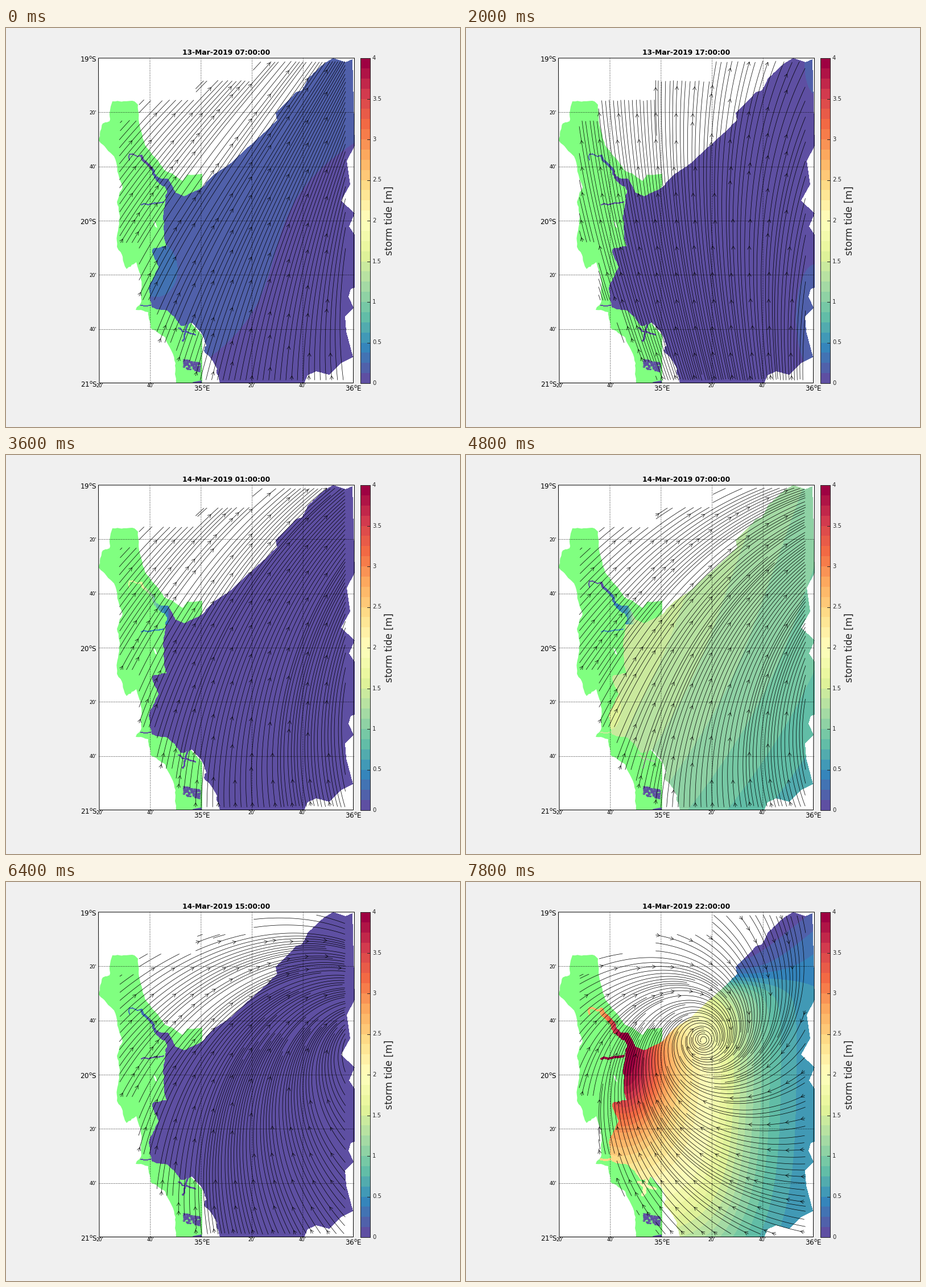
Animation, 798 px wide and 702 px high, one loop 8000 ms. Source, as a matplotlib script:

```python
import math
import random

import matplotlib.pyplot as plt
import numpy as np
from matplotlib.animation import FuncAnimation
from matplotlib.collections import LineCollection
from matplotlib.patches import Polygon, Rectangle
from matplotlib.path import Path

W, H, DPI = 798, 702, 100
HOURS, STEP_MS = 40, 200
PX = 72 / DPI
INK = "#262626"
BANDS = plt.get_cmap("Spectral_r")(np.linspace(0, 1, 32))

fig = plt.figure(figsize=(W / DPI, H / DPI), dpi=DPI, facecolor="#f0f0f0")
ax = fig.add_axes([0, 0, 1, 1])
ax.axis("off")


# ---- coastlines: a few key points, roughened --------------------------
def rough(points, amount, seed=1, depth=3):
    """Midpoint displacement along an open line."""
    rng = random.Random(seed)
    for _ in range(depth):
        out = [points[0]]
        for (xa, ya), (xb, yb) in zip(points, points[1:]):
            if math.hypot(xb - xa, yb - ya) > 6:
                out.append(((xa + xb) / 2 + rng.uniform(-amount, amount),
                            (ya + yb) / 2 + rng.uniform(-amount, amount)))
            out.append((xb, yb))
        points, amount = out, amount * 0.7
    return points


land_east = rough([
    (187, 129), (222, 128), (232, 135), (235, 172), (244, 205), (259, 225),
    (278, 250), (310, 269), (318, 258), (345, 256)], 1.5)
land_inner = [(345, 277), (292, 400), (290, 480), (345, 541), (345, 625)]
land_west = rough([
    (299, 625), (298, 590), (280, 545), (254, 528), (250, 500), (228, 496),
    (238, 480), (237, 436), (229, 412), (212, 424), (195, 385), (199, 345),
    (195, 306), (205, 280), (190, 226), (163, 198), (170, 168), (182, 164),
    (184, 138)], 2)
sea_east = [
    (575, 53), (597, 60), (609, 55), (613, 207), (599, 234), (605, 275),
    (589, 304), (613, 326), (603, 349), (613, 364), (613, 457), (606, 459),
    (602, 473), (611, 492), (596, 507), (598, 534), (610, 579), (590, 589),
    (568, 610), (545, 604), (530, 611), (524, 625), (376, 625)]
sea_west = rough([
    (373, 612), (371, 600), (348, 568), (351, 555), (345, 540), (327, 518),
    (307, 524), (283, 497), (256, 491), (252, 453), (268, 420), (258, 388),
    (282, 384), (277, 350), (279, 315), (283, 285), (264, 269)], 2.5)
sea_north = rough([
    (262, 263), (285, 265), (298, 290), (313, 296), (347, 279), (365, 258),
    (395, 238), (445, 192), (477, 162), (474, 150), (510, 113), (520, 110),
    (530, 90), (560, 62)], 0.8)
CREEKS = [  # half width, course
    (1.0, [(217, 232), (217, 222), (238, 225)]),
    (2.2, [(238, 225), (257, 248), (262, 263), (268, 267)]),
    (1.1, [(238, 311), (258, 309), (277, 306)]),
    (1.6, [(320, 520), (317, 534), (311, 550)]),
    (1.3, [(303, 528), (316, 534), (333, 540)]),
    (1.0, [(237, 488), (263, 489)])]


# ---- map frame --------------------------------------------------------
def shape(points, color, z):
    ax.add_patch(Polygon(points, fc=color, ec="none", zorder=z))


FRAME = [(162.5, 53), (612.5, 53), (610.5, 624.5), (164, 624.5)]
shape(FRAME, "white", 0)
shape(land_east + land_inner + land_west, "#80ff80", 1)
shape([(259, 339), (263, 343), (266, 352), (262, 349)], "white", 1.5)
ax.add_patch(Polygon(FRAME, fc="none", ec="black", lw=PX, zorder=6))

# salt pans in the south, a ragged patch that never changes
rng = random.Random(4)
for _ in range(110):
    t, across = rng.random(), rng.uniform(-1, 1)
    shape([(310 + 28 * t + dx, 590 + 6 * t + 8 * across + dy)
           for dx, dy in ((0, 0), (5, 0), (4, 2.5), (1, 2))], BANDS[0], 2.5)
shape([(328, 623), (344, 620), (344, 625), (329, 625)], BANDS[0], 2.5)

dots = dict(color="black", lw=PX, ls=(0, (1, 2)), zorder=4)
for k in range(4):
    x = 253 + 89.8 * k
    ax.plot([x, x + 0.8 - 0.5 * k], [53, 624], **dots)
for k in range(1, 6):
    y = 53 + 95.3 * k
    ax.plot([163, 612], [y, y], **dots)


def label(x, y, text, size, ha="center", va="center", **kw):
    return ax.text(x, y, text, fontsize=size * PX, ha=ha, va=va,
                   family="DejaVu Sans", zorder=8, **kw)


def degree(num, side):
    return f"{num}" + r"$^{\mathregular{o}}$" + side


for k in range(3):
    label(159.5 + k * 0.7, 60 + 286 * k, degree(19 + k, "S"), 12, "right",
          "baseline")
for k in (1, 2, 4, 5):
    label(159.5, 54 + 95.3 * k, f"{k % 3 * 20}'", 8.4, "right")
for k in (0, 1, 3, 4):
    label(165 + 89 * k, 630, f"{(k + 1) % 3 * 20}'", 8.4)
for x, num in ((345, 35), (611, 36)):
    label(x, 639, degree(num, "E"), 12, va="baseline")
title = label(387.5, 47, "", 12.25, va="baseline", weight="bold")

# ---- colour bar -------------------------------------------------------
BAR_H = 572 / 32
for k, col in enumerate(BANDS):
    ax.add_patch(Rectangle((622.5, 625 - (k + 1) * BAR_H), 17, BAR_H,
                           fc=col, ec="none", zorder=2))
ax.add_patch(Rectangle((622.5, 53), 17, 572, fc="none", ec=INK, lw=PX,
                       zorder=3))
for k in range(9):
    y = 625 - k * 71.5
    ax.plot([635, 639.5], [y, y], color=INK, lw=PX, zorder=3)
    label(644, y, f"{k / 2:g}", 10, "left", color=INK)
label(674, 339, "storm tide [m]", 17, rotation=90, color=INK)


def blend(n, times, items):
    i = min(max(np.searchsorted(times, n) - 1, 0), len(times) - 2)
    f = (n - times[i]) / (times[i + 1] - times[i])
    return items[i] * (1 - f) + items[i + 1] * f


# ---- water level ------------------------------------------------------
LEFT, TOP, RIGHT, BASE = 160, 52, 614, 626
X, Y = np.meshgrid(np.arange(LEFT, RIGHT) + 0.5, np.arange(TOP, BASE) + 0.5)


def bump(cx, cy, rx, ry):
    return np.exp(-((X - cx) / rx) ** 2 - ((Y - cy) / ry) ** 2)


def ramp(z):
    return 1 / (1 + np.exp(-z))


edge = 472 - 0.28 * (Y - 400) - 1.1e-5 * (Y - 400) ** 3
ebb = (0.125 + np.minimum((edge - X) * 0.0004, 0.08)
       + 0.12 * bump(270, 428, 38, 50))
rise = 0.05 + 0.2 * (bump(613, 510, 33, 95) + bump(615, 65, 20, 52))
high = (np.minimum(1.375 - 0.0018 * (X - 367) - 0.00064 * (Y - 300)
                   - 1.2e-6 * np.maximum(Y - 300, 0) ** 2, 1.48)
        + 0.15 * bump(258, 455, 18, 35))
surge = (0.45 * ramp((Y - 120 + 0.8 * (X - 560)) / 30)
         + 2.05 * ramp((475 - X) / 45) * ramp((625 - Y) / 70)
         * ramp((Y - 175) / 12)
         + 1.95 * bump(275, 290, 75, 135))
low = np.full_like(X, -0.5)
TIDE_T = [0, 6, 10, 13, 18, 24, 32, 39]
TIDE = [ebb, low, rise, 0.45 * high, low, high, low, surge]
UPPER = [0.05, 0.05, 0.2, 0.3, 1.7, 0.05, 0.35, 2.7]
ESTUARY = [0.2, 0.05, 0.05, 0.5, 0.4, 0.6, 0, 4.2]

sea = Path(sea_east + sea_west + sea_north)
sea_mask = sea.contains_points(
    np.column_stack([X.ravel(), Y.ravel()])).reshape(X.shape)
reach = np.full_like(X, 99.0)
for half, course in CREEKS:
    course = rough(course, 2.5, seed=3, depth=2)
    for (xa, ya), (xb, yb) in zip(course, course[1:]):
        dx, dy = xb - xa, yb - ya
        t = np.clip(((X - xa) * dx + (Y - ya) * dy) / (dx**2 + dy**2), 0, 1)
        gap = np.hypot(X - xa - t * dx, Y - ya - t * dy)
        reach = np.minimum(reach, gap / half)
side_creek = (X < 277) & (Y > 298) & (Y < 322)
in_river = np.clip((298 - X) / 14, 0, 1) * ((Y > 212) & (Y < 298))
in_river = np.where(side_creek, 1, in_river)
along = np.where(side_creek, 1, np.clip((X - 235) / 45, 0, 1))

water = ax.imshow(np.zeros(X.shape + (4,)), extent=(LEFT, RIGHT, BASE, TOP),
                  interpolation="nearest", aspect="auto", zorder=2)


def paint_water(n):
    river = (np.interp(n, TIDE_T, UPPER) * (1 - along)
             + np.interp(n, TIDE_T, ESTUARY) * along)
    level = blend(n, TIDE_T, TIDE) * (1 - in_river) + river * in_river
    rgba = BANDS[np.clip(np.floor(level / 0.125), 0, 31).astype(int)]
    flood = 0.9 * min(max((n - 33) / 6, 0), 1)
    rgba[..., 3] = sea_mask | (reach < 1 + flood)
    return rgba


# ---- wind direction ---------------------------------------------------
X0, X1, Y0, Y1, CELL = 199, 597, 58, 619, 2
WX, WY = np.meshgrid(np.arange(X0, X1, CELL) + CELL / 2,
                     np.arange(Y0, Y1, CELL) + CELL / 2)
EYE_T = [0, 18, 24, 32, 39]
EYE_X, EYE_Y = [1000, 900, 800, 650, 416], [400, 340, 310, 285, 277]


def vortex(n):
    """Clockwise swirl round the storm's eye with inflow growing outwards."""
    dx = WX - np.interp(n, EYE_T, EYE_X)
    dy = WY - np.interp(n, EYE_T, EYE_Y)
    inflow = 40 * (1 - np.exp(-np.hypot(dx, dy) / 100))
    return np.degrees(np.arctan2(-dx, -dy)) - inflow


def breeze(mid, east, south, twist, bend):
    """Degrees above east, varying smoothly over the map."""
    u, v = (WX - 400) / 200, (WY - 339) / 280
    return mid + east * u + south * v + twist * u * v + bend * u * u


BREEZES = {0: breeze(62, 11, 17, 2, 6), 6: breeze(97, -10, 19, -2, -14),
           10: breeze(95, -14, 12, 2, -5), 18: breeze(66, 7, 27, 7, 0),
           24: breeze(59, 6, 32, 15, 0)}
WIND_T = [*BREEZES, 32, 39]
# far from land the breeze gives way to the storm alone
excess = [(a - vortex(t) + 180) % 360 - 180 for t, a in BREEZES.items()]
excess += [np.zeros_like(WX)] * 2


def stairs(edges, values):
    return np.array(values)[np.searchsorted(edges, WX, side="right")]


VALID = ((WY >= stairs([233, 333, 433], [162, 127, 92, 58]))
         & (WY <= stairs([233, 266, 300, 333], [377, 480, 553, 587, 619])))
NR, NC = VALID.shape
VALID = VALID.tolist()

# ---- evenly spaced streamlines ----------------------------------------
SEEDS, STRIDE, HEADS = 40, 2.5, 12
SEED_W, SEED_H = (X1 - X0) / SEEDS, (Y1 - Y0) / SEEDS
HEAD_W, HEAD_H = (X1 - X0) / HEADS, (Y1 - Y0) / HEADS


def inside(x, y):
    j, i = int((x - X0) // CELL), int((y - Y0) // CELL)
    return 0 <= i < NR and 0 <= j < NC and VALID[i][j]


def trace(x, y, sign, ident, u, v, seeded, used):
    pts = []
    for k in range(500):
        if not inside(x, y):
            break
        key = (int((x - X0) / SEED_W * 4), int((y - Y0) / SEED_H * 4))
        owner, when = used.get(key, (ident, sign * k))
        if owner != ident or abs(when - sign * k) > 12:
            break
        used[key] = (ident, sign * k)
        seeded.add((key[0] // 4, key[1] // 4))
        pts.append((x, y))
        j, i = int((x - X0) // CELL), int((y - Y0) // CELL)
        x += sign * STRIDE * u[i][j]
        y += sign * STRIDE * v[i][j]
    return pts


def arrow_head(tail, tip):
    a = math.atan2(tip[1] - tail[1], tip[0] - tail[0])
    wings = [(tip[0] - 6.5 * math.cos(a + s), tip[1] - 6.5 * math.sin(a + s))
             for s in (0.5, -0.5)]
    return [wings[0], tip, wings[1]]


def streamlines(n):
    angle = np.radians(vortex(n) + blend(n, WIND_T, excess))
    u, v = np.cos(angle).tolist(), (-np.sin(angle)).tolist()
    seeded, used, heads, out = set(), {}, {}, []
    for c in range(SEEDS):
        for r in reversed(range(SEEDS)):
            x, y = X0 + (c + 0.5) * SEED_W, Y0 + (r + 0.5) * SEED_H
            if (c, r) in seeded or not inside(x, y):
                continue
            ahead = trace(x, y, 1, (c, r), u, v, seeded, used)
            back = trace(x, y, -1, (c, r), u, v, seeded, used)
            line = back[:0:-1] + ahead
            if len(line) < 3:
                continue
            out.append(line)
            for tail, tip in zip(line[1:], line[3:]):
                cell = (int((tip[0] - X0) / HEAD_W),
                        int((tip[1] - Y0) / HEAD_H))
                if cell not in heads and all(
                        math.dist(tip, p) > 14 for p in heads.values()):
                    heads[cell] = tip
                    out.append(arrow_head(tail, tip))
    return out


wind = LineCollection([], colors="black", linewidths=0.52, zorder=5)
ax.add_collection(wind, autolim=False)
ax.set(xlim=(0, W), ylim=(H, 0))


def draw(n):
    hour = 7 + n
    title.set_text(f"{13 + hour // 24}-Mar-2019 {hour % 24:02d}:00:00")
    water.set_data(paint_water(n))
    wind.set_segments(streamlines(n))
    return title, water, wind


anim = FuncAnimation(fig, draw, frames=HOURS, interval=STEP_MS, repeat=True,
                     repeat_delay=0)
plt.show()
```
